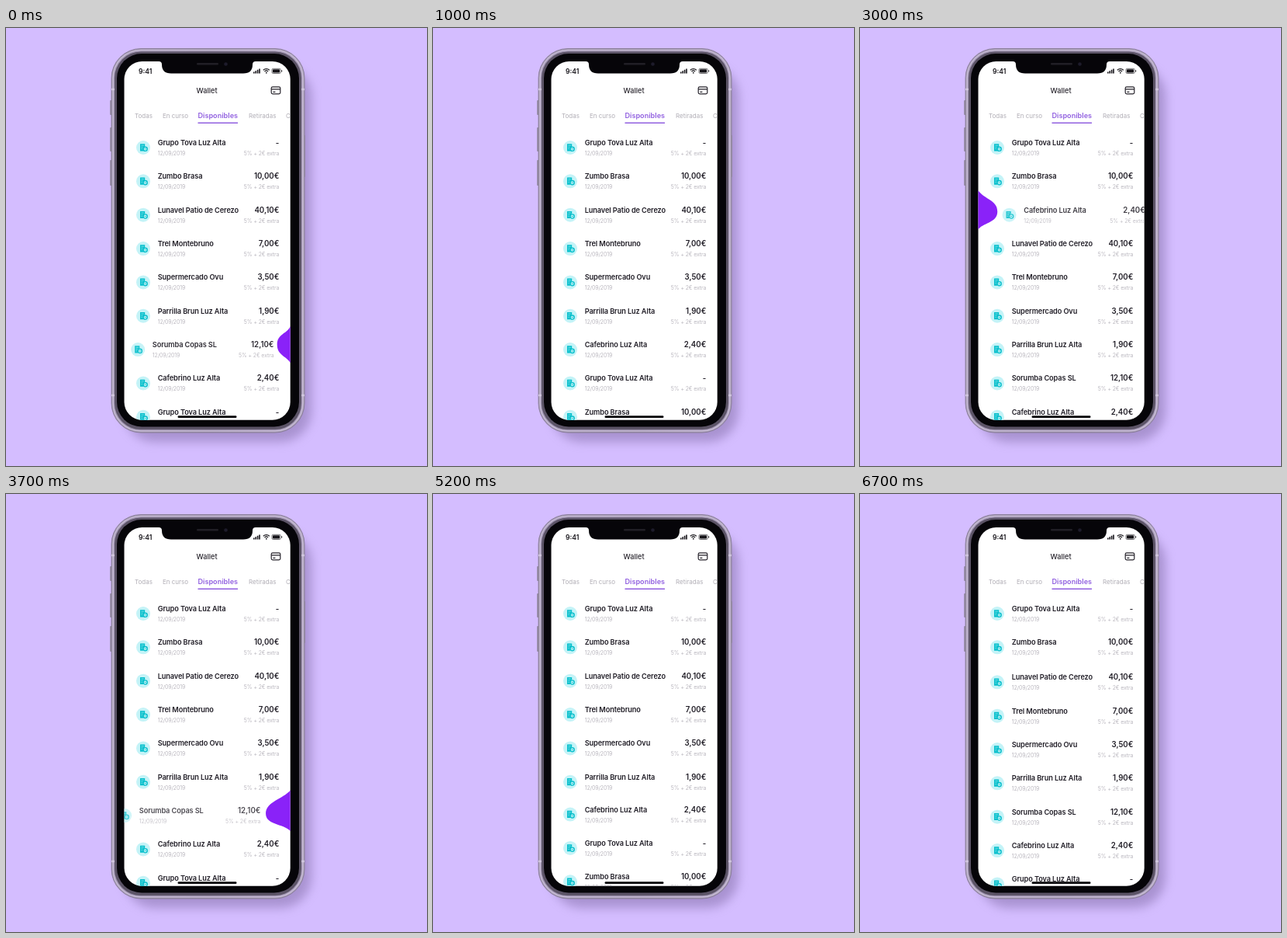
Write an HTML page that moves like this. It is 543 px wide and 564 px high and loops after 6800 ms.

```html
<!DOCTYPE html>
<html lang="es">
<head>
<meta charset="utf-8">
<title>Wallet</title>
<style>
  html, body { margin: 0; width: 100%; height: 100%; overflow: hidden; background: #d4bdff; }
  svg { display: block; width: 543px; height: 564px; font-family: Inter, "Liberation Sans", sans-serif; }
  .name { font-size: 9.2px; font-weight: 600; letter-spacing: -.1px; fill: #211e27; }
  .sum { font-size: 9.7px; font-weight: 600; fill: #211e27; text-anchor: end; }
  .note { font-size: 6.9px; letter-spacing: -.08px; fill: #b9b6be; }
  .end { text-anchor: end; }
  .tab { font-size: 8px; fill: #b0adb5; }
  .on { font-size: 9.1px; font-weight: 600; fill: #9160e0; }
  .blob { fill: #8a22f8; }
</style>
</head>
<body>
<svg viewBox="0 0 543 564">
  <defs>
    <clipPath id="screen"><rect x="152.5" y="43" width="214.2" height="461.7" rx="23"/></clipPath>
    <filter id="soft" x="-20%" y="-20%" width="140%" height="140%"><feGaussianBlur stdDeviation="6.5"/></filter>
    <linearGradient id="metal">
      <stop offset="0" stop-color="#a095b2"/>
      <stop offset=".5" stop-color="#958aa6"/>
      <stop offset="1" stop-color="#a89cba"/>
    </linearGradient>
    <g id="coin">
      <circle r="9" fill="#c4f3f7"/>
      <path d="M-4-4.8h6.2v3.2a3.6 3.6 0 0 0-1.4 6H-4z" fill="#06bfcc"/>
      <path d="M-2.7-2.8h3.6M-2.7-.6h2.2M-2.7 1.6h1.7" stroke="#c4f3f7" stroke-width=".6"/>
      <circle cx="2.6" cy="1.8" r="2.6" fill="#c4f3f7" stroke="#06bfcc" stroke-width="1.4"/>
      <path d="M1.6 1.8h2" stroke="#06bfcc" stroke-width=".9"/>
    </g>
  </defs>

  <rect width="543" height="564" fill="#d4bdff"/>
  <rect x="152" y="48" width="242" height="485" rx="40" fill="#8570ab" opacity=".55" filter="url(#soft)"/>

  <g fill="#9a8fab">
    <rect x="134" y="93" width="4" height="19" rx="1"/>
    <rect x="134" y="128" width="4" height="31" rx="1"/>
    <rect x="134" y="170" width="4" height="33" rx="1"/>
    <rect x="383" y="138" width="3" height="54" rx="1"/>
  </g>
  <rect x="136" y="26.5" width="249" height="494.500" rx="38" fill="url(#metal)" stroke="#83798f" stroke-width=".8"/>
  <rect x="138" y="28.500" width="245" height="490.500" rx="36" fill="none" stroke="#c6bbd3" stroke-width="1.6"/>
  <path d="M136 79h4M381 79h4M136 473h4M381 473h4" stroke="#cfc5dc" stroke-width="2.5"/>
  <rect x="140" y="30.500" width="241" height="486.500" rx="34" fill="#5c5467"/>
  <rect x="143" y="33" width="235" height="480.500" rx="32" fill="#060509"/>

  <g clip-path="url(#screen)">
    <rect x="152" y="42" width="216" height="464" fill="#fff"/>
    <g id="list"></g>
    <g id="drops"></g>
    <text x="171" y="58.6" font-size="8.6" font-weight="600" fill="#151318">9:41</text>
    <text x="259" y="84" font-size="9.2" font-weight="500" fill="#2b2830" text-anchor="middle">Wallet</text>
    <g class="tab">
      <text x="166" y="116">Todas</text>
      <text x="202" y="116">En curso</text>
      <text x="247.5" y="116" class="on">Disponibles</text>
      <text x="313" y="116">Retiradas</text>
      <text x="361" y="116">Canceladas</text>
    </g>
    <rect x="247.5" y="121.5" width="51.5" height="1.5" fill="#9160e0"/>
    <g fill="none" stroke="#26232b" stroke-width="1.2">
      <rect x="342.2" y="75.8" width="11.6" height="9" rx="1.8"/>
      <path d="M342.2 78.8h11.6M344.4 82.3h3"/>
    </g>
    <g fill="#151318">
      <path d="M319 56.4h1.6v2h-1.6zM321.4 55.2h1.6v3.2h-1.6zM323.8 53.8h1.6v4.6h-1.6zM326.2 52.4h1.6v6h-1.6z"/>
      <rect x="344" y="53.3" width="9" height="4.2" rx=".8"/>
      <rect x="355.2" y="54.4" width="1" height="2"/>
      <circle cx="335.8" cy="57.7" r=".9"/>
    </g>
    <g fill="none" stroke="#151318">
      <rect x="343" y="52.3" width="11.2" height="6.2" rx="1.6" stroke-width=".6"/>
      <path d="M331.8 54.3a5.8 5.8 0 0 1 8 0M333.5 56.1a3.3 3.3 0 0 1 4.6 0" stroke-width="1.2"/>
    </g>
    <rect x="221.5" y="499.3" width="76" height="2.8" rx="1.4" fill="#08070a"/>
  </g>

  <path d="M197 41v2q4 0 4 4 0 11.5 12 11.5h93q12 0 12-11.5 0-4 4-4v-2z" fill="#060509"/>
  <rect x="246" y="45" width="28" height="2.6" rx="1.3" fill="#211f26"/>
  <circle cx="283.5" cy="46.5" r="2.3" fill="#1d1b2b"/>
</svg>

<script>
const LOOP = 6800, STEP = 100, TOP = 147.5, PITCH = 43.35;
const CANCEL = 2, CLAIM = 7; // rows that get swiped away
const rows = [
  ["Grupo Tova Luz Alta", "-"],
  ["Zumbo Brasa", "10,00€"],
  ["Cafebrino Luz Alta", "2,40€"],
  ["Lunavel Patio de Cerezo", "40,10€"],
  ["Trel Montebruno", "7,00€"],
  ["Supermercado Ovu", "3,50€"],
  ["Parrilla Brun Luz Alta", "1,90€"],
  ["Sorumba Copas SL", "12,10€"],
  ["Cafebrino Luz Alta", "2,40€"],
  ["Grupo Tova Luz Alta", "-"],
  ["Zumbo Brasa", "10,00€"]
];

const list = document.getElementById("list");
const drops = document.getElementById("drops");
list.innerHTML = rows.map(([name, sum]) => `<g>
  <use href="#coin" x="177" y="6.5"/>
  <text class="name" x="195.7" y="3.4">${name}</text>
  <text class="note" x="195.7" y="16.5">12/09/2019</text>
  <text class="sum" x="352.3" y="3.5">${sum}</text>
  <text class="note end" x="352.3" y="16.5">5% + 2€ extra</text>
</g>`).join("");
const items = [...list.children];

const clamp = (x, lo = 0, hi = 1) => Math.min(hi, Math.max(lo, x));
const wave = p => (1 - Math.cos(Math.PI * clamp(p))) / 2;

// Time since each swipe began; the list is reset by a hard cut
function clocks(t) {
  if (t < 1750) return [1e4, t + 60];
  if (t < 5350) return [t - 2900, t - 3569];
  return [t - 6000, t - 6740];
}

const pull = u => 90 * (clamp(u, 0, 700) / 300) ** 1.6;
const closed = u => wave((u - 380) / 365);

function bump(depth, half, lean) {
  return `<path class="blob" d="M-2 ${-half}H0C${.32 * depth} ${-.55 * half} ${depth} ${lean - .58 * half} ${depth} ${lean}` +
    `S${.32 * depth} ${.62 * half} 0 ${half}H-2Z"/>`;
}

function drop(u, dir, y) {
  const o = pull(u);
  if (u <= 0 || u > 540) return "";
  const depth = Math.min(2.6 * o, 11.4 + .86 * o, 15.7 + .68 * o, 92);
  const half = Math.min(14 + 1.5 * o, 22.4 + .17 * o, Math.max(0, 32.1 - .235 * o));
  const lean = clamp((depth - 17) * .25, 0, 6);
  const apart = o > 55;
  const base = apart ? Math.max(0, 8 + (90 - o) * .7) : depth;
  let shape = base > 0 ? bump(base, half, lean) : "";
  if (apart) {
    const size = 1 - wave((u - 380) / 160);
    if (o > 75 && o < 110) shape += `<circle class="blob" cx="${depth - 45}" cy="6.5" r="1.4"/>`;
    shape += `<g transform="translate(${depth - 12} 6) scale(${size})"><circle class="blob" r="12"/>
      <path d="M-2-4L6 4M6-4L-2 4" stroke="#fff" stroke-width="1.6" stroke-linecap="round"/></g>`;
  }
  const edge = dir > 0 ? 152.5 : 367;
  return `<g transform="translate(${edge} ${y}) scale(${dir} 1)">${shape}</g>`;
}

function draw(t) {
  const [a, b] = clocks(t);
  const gapA = closed(a) * PITCH;
  const gapB = closed(b) * PITCH + 1.5 * wave((b - 1060) / 500);
  const rowY = i => TOP + i * PITCH - (i > CANCEL ? gapA : 0) - (i > CLAIM ? gapB : 0);
  items.forEach((item, i) => {
    const swipe = i === CANCEL ? pull(a) : i === CLAIM ? -pull(b) : 0;
    item.setAttribute("transform", `translate(${swipe} ${rowY(i)})`);
    item.setAttribute("opacity", clamp(1 - Math.abs(swipe) / 112));
  });
  drops.innerHTML = drop(a, 1, rowY(CANCEL)) + drop(b, -1, rowY(CLAIM));
}

const start = performance.now();
function tick() {
  const t = (performance.now() - start) % LOOP;
  draw(Math.floor(t / STEP) * STEP);
  requestAnimationFrame(tick);
}
tick();
</script>
</body>
</html>
```
